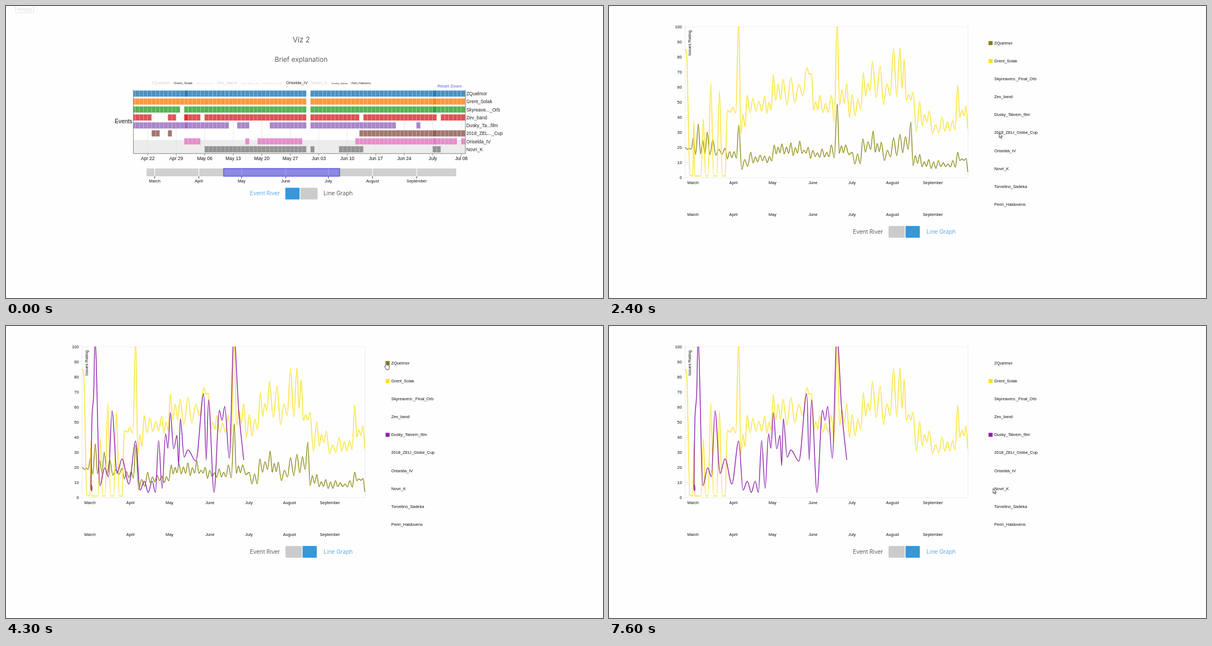
Animation, 1070 px wide and 523 px high, one loop 8000 ms. Source, as an HTML page:

```html
<!DOCTYPE html>
<html lang="en">
<head>
<meta charset="utf-8">
<title>Viz 2</title>
<style>
html, body { margin: 0; width: 100%; height: 100%; overflow: hidden; background: #fefefe; }
svg { display: block; }
text { font-family: "Liberation Sans", Arial, sans-serif; fill: #111; }
.ui { font-family: Inter, sans-serif; font-weight: 300; fill: #333; }
</style>
</head>
<body>
<svg id="stage" width="1070" height="523" viewBox="0 0 1070 523"></svg>
<script>
const NS = 'http://www.w3.org/2000/svg';
const LOOP = 8000;
const stage = document.getElementById('stage');

function add(parent, tag, attrs, content) {
  const el = document.createElementNS(NS, tag);
  for (const key in attrs) el.setAttribute(key, attrs[key]);
  if (content !== undefined) el.textContent = content;
  parent.appendChild(el);
  return el;
}
const group = (parent, attrs = {}) => add(parent, 'g', attrs);
const rect = (p, x, y, width, height, fill, more) =>
  add(p, 'rect', { x, y, width, height, fill, ...more });
const line = (p, d, stroke, width = 1) =>
  add(p, 'path', { d, stroke, 'stroke-width': width, fill: 'none' });
const text = (p, str, x, y, size, more) =>
  add(p, 'text', { x, y, 'font-size': size, ...more }, str);
const mid = { 'text-anchor': 'middle' };
const end = { 'text-anchor': 'end' };
const lerp = (a, b, k) => a + (b - a) * k;

function clip(id, x, y, width, height) {
  rect(add(stage, 'clipPath', { id }), x, y, width, height, '#000');
  return `url(#${id})`;
}

const names = ['ZQuelmor', 'Grent_Solak', 'Skyreavers:_Final_Orb', 'Zev_band', 'Dusky_Talvern_film',
  '2018_ZELI_Globe_Cup', 'Oriselda_IV', 'Novri_K', 'Torvelino_Sadeka', 'Perin_Haldovens'];
const firstDay = Date.UTC(2018, 2, 1);
const months = ['March', 'April', 'May', 'June', 'July', 'August', 'September']
  .map((name, i) => ({ name, day: (Date.UTC(2018, 2 + i, 1) - firstDay) / 864e5 }));

// ---- Event river ----
const river = group(stage);
const DAY = 7.3;
const dayX = k => 254 + k * DAY;

text(river, 'Viz 2', 529.5, 65, 13.2, { class: 'ui', ...mid });
text(river, 'Brief explanation', 529, 100, 12.2, { class: 'ui', ...mid });

const tags = text(river, '', 254, 140, 8);
const tagSizes = [7.4, 6, 2.9, 8, 3.8, 3.3, 7.4, 8, 3.7, 4.5];
const darkTags = [1, 6, 8, 9];
names.forEach((name, i) => add(tags, 'tspan', {
  dx: 7, 'font-size': tagSizes[i], fill: darkTags.includes(i) ? '#222' : '#d2d2d2'
}, name));
text(river, 'Reset Zoom', 773.5, 146, 7.95, { style: 'fill:#5f55f0' });

rect(river, 228, 240, 595, 24, '#ececec');
['Apr 22', 'Apr 29', 'May 06', 'May 13', 'May 20', 'May 27', 'Jun 03', 'Jun 10', 'Jun 17',
 'Jun 24', 'July', 'Jul 08'].forEach((label, i) => {
  const x = dayX(i * 7);
  line(river, `M${x} 151V264`, '#e2e2e2', 0.8);
  line(river, `M${x} 264v4`, '#777', 0.8);
  text(river, label, x, 276.3, 8.4, mid);
});

// colour, label, spans of days counted from Apr 22
const rows = [
  ['#1f77b4', 'ZQuelmor', [[-4, 39], [40, 78]]],
  ['#ff7f0e', 'Grent_Solak', [[-4, 39], [40, 78]]],
  ['#2ca02c', 'Skyreave..._Orb', [[-4, 8], [9, 39], [40, 78]]],
  ['#d62728', 'Zev_band', [[-4, 1], [5, 7], [9, 13], [14, 39], [40, 52], [53, 71], [72, 78]]],
  ['#9467bd', 'Dusky_Ta...film', [[-4, 20], [22, 25], [30, 39], [40, 61], [66, 67]]],
  ['#8c564b', '2018_ZEL..._Cup', [[1, 3], [5, 6], [52, 78]]],
  ['#e377c2', 'Oriselda_IV', [[9, 13], [24, 25], [27, 38], [51, 76], [77, 78]]],
  ['#7f7f7f', 'Novri_K', [[14, 39], [40, 41], [47, 53], [70, 72]]]
];
const doubled = { 9: [0, 3, 4], 70: [0, 1, 2, 5, 6] };
const cells = group(river, { 'clip-path': clip('riverClip', 228, 150, 595.5, 115) });
rows.forEach(([color, label, spans], r) => {
  const y = 151.4 + r * 14.25;
  for (const [from, to] of spans) {
    for (let k = from; k < to; k++) {
      const opacity = doubled[k]?.includes(r) ? 0.95 : 0.8;
      rect(cells, dayX(k) - 0.2, y, DAY - 0.35, 11, color, { opacity });
    }
  }
  text(river, label, 825, y + 8.6, 8.35, { style: 'fill:#222' });
});
line(river, 'M228.3 150V264.3H823.3V150', '#777', 0.9);
text(river, 'Events', 195, 210.4, 10.3);

rect(river, 252, 291, 555, 14, '#d0d0d0');
for (const { name, day } of months) {
  const x = 266.5 + day * 2.552;
  line(river, `M${x} 291v14`, '#fff', 1.2);
  line(river, `M${x} 305v4`, '#222', 0.9);
  text(river, name, x, 315.7, 7.4, mid);
}
rect(river, 390, 291, 208, 14, '#5650f0', { 'fill-opacity': 0.55, stroke: '#4038e0' });

// ---- Line graph ----
const OLIVE = '#808000', YELLOW = '#fbe11f', PURPLE = '#8e1fae';
const graph = group(stage);

rect(graph, 136.5, 37, 507, 270.5, 'none', { stroke: '#e8e8e8', 'stroke-width': 0.8 });
for (let v = 0; v <= 100; v += 10) {
  const y = 307.5 - v * 2.705;
  text(graph, v, 130.5, y + 2.5, 7.4, end);
  line(graph, `M133 ${y}h3.5`, '#e8e8e8', 0.7);
}
for (const { name, day } of months) {
  const x = 150.5 + day * 2.337;
  text(graph, name, x, 319.3, 7.4, mid);
  text(graph, name, x, 376.3, 7.4, mid);
}

// Monotone cubic through [x, y] points
function curve(pts) {
  const last = pts.length - 1;
  const slope = i => (pts[i + 1][1] - pts[i][1]) / (pts[i + 1][0] - pts[i][0]);
  const tangent = i => {
    if (i === 0) return slope(0);
    if (i === last) return slope(last - 1);
    const a = slope(i - 1), b = slope(i);
    return a * b <= 0 ? 0 : 2 * a * b / (a + b);
  };
  let d = `M${pts[0]}`;
  for (let i = 0; i < last; i++) {
    const [x, y] = pts[i], [u, v] = pts[i + 1], h = (u - x) / 3;
    d += `C${x + h} ${y + h * tangent(i)} ${u - h} ${v - h * tangent(i + 1)} ${u} ${v}`;
  }
  return d;
}

// Peaks [x, top, dip after it]; wide gaps get extra dips with small seeded peaks between
function weave(peaks, period, seed) {
  const random = () => {
    seed = seed * 16807 % 2147483647;
    return seed / 2147483647;
  };
  return peaks.flatMap(([x, top, dip], i) => {
    const pts = [[x, top]];
    if (i === peaks.length - 1) return pts;
    const [nextX, nextTop] = peaks[i + 1];
    const dips = Math.max(1, Math.round((nextX - x) / period));
    const crest = Math.max(top, nextTop);
    for (let j = 0; j < dips; j++) {
      if (j) pts.push([lerp(x, nextX, j / dips), lerp(dip, crest, 0.5 + random() * 0.4)]);
      const lift = j ? random() * 0.25 : 0;
      pts.push([lerp(x, nextX, (j + 0.5) / dips), lerp(dip, crest, lift)]);
    }
    return pts;
  });
}

const FLOOR = 304.5;
const pulse = (x, top, w) => [[x - w, FLOOR], [x, top], [x + w, FLOOR]];

const olive = weave([
  [137, 253, 257], [151, 237, 266], [160, 211, 265], [176, 226, 266], [186, 240, 267],
  [208, 255, 274], [232.5, 213, 293], [254, 262, 281], [296, 249, 265], [310, 247, 265],
  [326, 245, 268], [342, 242, 264], [357, 253, 273], [398.5, 249, 272], [409, 175, 264],
  [424, 249, 266], [436, 262, 283], [455, 238, 262], [473.5, 224, 262], [488, 244, 277],
  [510, 236, 268], [521.5, 230, 263], [541, 208, 286], [557, 266, 288], [573, 275, 291],
  [625, 262, 277], [640, 273]
], 9, 11).concat([[643, 297]]);

const yellow = [
  [137, 77], [139, 82], [145, 303],
  ...pulse(152, 206, 1.8), ...pulse(169, 202, 4.2), ...pulse(182.5, 138, 5), ...pulse(198, 152, 5),
  [208, FLOOR],
  ...weave([
    [212, 187, 190], [222, 182, 192], [232.5, 20, 230], [247.5, 160, 191], [279, 161, 192],
    [294.5, 123, 169], [312, 131, 177], [326, 128, 174], [340, 140, 161], [354.5, 110, 122],
    [363, 121, 186], [378, 160, 191], [398.5, 160, 208], [409, 25, 178], [426, 139, 200],
    [456, 119, 162], [472, 99, 164], [486, 107, 177], [510, 76, 163], [521.5, 75, 148],
    [529, 96, 169], [545, 155, 225], [557, 171, 215], [574, 188, 229], [597, 199, 224],
    [625, 142, 199], [640, 179]
  ], 10, 29),
  [643, 220]
];

const purple = [[152.3, 284], [154.2, 160], [157, 125], ...weave([
  [159.5, 22, 286], [177, 254, 270], [190, 152, 264], [208, 238, 283], [232.5, 206, 294],
  [248, 278, 298], [262, 278, 298], [273.5, 205, 291], [286, 193, 219], [294.5, 155, 220],
  [306.5, 196, 250], [312.5, 166, 235], [326, 222, 242], [354.5, 121, 240], [363, 132, 298],
  [382.5, 151, 169], [392, 144, 237], [408.5, 15]
], 30, 1), [417, 150], [426, 240]];

const plot = group(graph, { 'clip-path': clip('plotClip', 136, 36.8, 508, 271) });
const oliveLine = line(plot, curve(olive), OLIVE, 1.3);
line(plot, curve(yellow), YELLOW, 1.4);
const purpleLine = line(plot,
  'M152.3 284Q155.5 288 153.5 295Q151.5 292 152.3 284' + curve(purple), PURPLE, 1.4);
text(graph, 'Issues Rating', 0, 0, 7.5, { transform: 'translate(146.5 43.5) rotate(-90)', ...end });

const legendY = i => 66.2 + i * 32.13;
names.forEach((name, i) => text(graph, name, 690.5, legendY(i) + 2.6, 7.4));
const swatch = (i, fill) => rect(graph, 680.3, legendY(i) - 3.4, 7.2, 7.2, fill);
const oliveBox = swatch(0, OLIVE);
swatch(1, YELLOW);
const purpleBox = swatch(4, PURPLE);

// ---- Switch ----
const toggle = group(stage);
const leftLabel = text(toggle, 'Event River', 491, 339, 10.3, { class: 'ui', ...end });
const rightLabel = text(toggle, 'Line Graph', 569, 339, 10.3, { class: 'ui' });
rect(toggle, 501, 325.5, 57.5, 21, '#cbcbcb', { rx: 2 });
const knob = group(toggle);
rect(knob, -1.5, 325, 28.5, 22, '#fefefe');
rect(knob, 0, 325.5, 25.5, 21, '#3498db', { rx: 1 });

// ---- Overlay button and pointers ----
const restart = group(stage);
rect(restart, 16.5, -2, 33, 14, 'none', { stroke: '#e2e2e2', rx: 1 });
text(restart, 'Restart', 33, 8.5, 8.3, { style: 'fill:#dcdcdc', ...mid });

const outline = { fill: '#fff', stroke: '#222', 'stroke-width': 0.8, 'stroke-linejoin': 'round' };
const pointers = {
  cross: line(stage, 'M-6 0H5.5M0 -6.5V6.5', '#fff', 1.1),
  arrow: add(stage, 'path', { d: 'M.4 .4V9.2L2.4 7.4L3.8 10.6L5 10.1L3.7 7H6.3Z', ...outline }),
  hand: add(stage, 'path', {
    d: 'M2.6 8V1.4a.9.9 0 0 1 1.8 0V5.6q1.5-.6 1.7.5q1.4-.5 1.6.5q1.4-.2 1.4 1V10.4q0 1.6-1 2.6V14.2H3.4V13L.6 9.2q-.5-1.2.6-1.3Z',
    ...outline })
};

// start, arrival, pointer, from, to; each holds until the next starts
const moves = [
  [0, 0, 'none', [0, 0], [0, 0]],
  [500, 800, 'cross', [556, 343], [554, 342]],
  [1400, 1400, 'none', [0, 0], [0, 0]],
  [2300, 2600, 'arrow', [706, 246], [685, 188]],
  [2900, 2900, 'hand', [684, 191.5], [684, 191.5]],
  [3500, 4000, 'arrow', [685, 124], [681, 66]],
  [4200, 4300, 'hand', [679, 65], [678, 64]],
  [5300, 5700, 'cross', [452, 182], [554, 210]],
  [5900, 6100, 'arrow', [737, 274], [707, 269]],
  [6300, 6600, 'arrow', [701, 273], [689, 288.5]],
  [7500, 7600, 'arrow', [689, 289.5], [688, 290.5]]
];

const show = (el, on) => { el.style.display = on ? '' : 'none'; };
const place = (el, x, y) => el.setAttribute('transform', `translate(${x} ${y})`);

function drawPointer(t) {
  const [start, arrival, kind, from, to] = moves.filter(m => m[0] <= t).pop();
  const k = t >= arrival ? 1 : (t - start) / (arrival - start);
  for (const key in pointers) show(pointers[key], key === kind);
  if (pointers[kind]) place(pointers[kind], lerp(from[0], to[0], k), lerp(from[1], to[1], k));
}

function draw(t) {
  const lineMode = t >= 1400;
  show(river, !lineMode);
  show(graph, lineMode);
  place(toggle, 0, lineMode ? 68.5 : 0);
  leftLabel.style.fill = lineMode ? '' : '#3498db';
  rightLabel.style.fill = lineMode ? '#3498db' : '';
  place(knob, !lineMode ? 500.7 : t < 1500 ? 524 : 531.5, 0);

  show(oliveLine, t < 4900);
  show(purpleLine, t >= 3500);
  oliveBox.style.opacity = t < 4900 ? 1 : t < 5000 ? 0.45 : 0;
  purpleBox.style.opacity = t < 3100 ? 0 : t < 3200 ? 0.5 : 1;
  restart.style.opacity = Math.max(0, 1 - t / 600);
  drawPointer(t);
}

// The picture advances in steps of 100 ms
function tick() {
  draw(Math.floor(performance.now() % LOOP / 100) * 100);
  requestAnimationFrame(tick);
}
tick();
</script>
</body>
</html>
```
